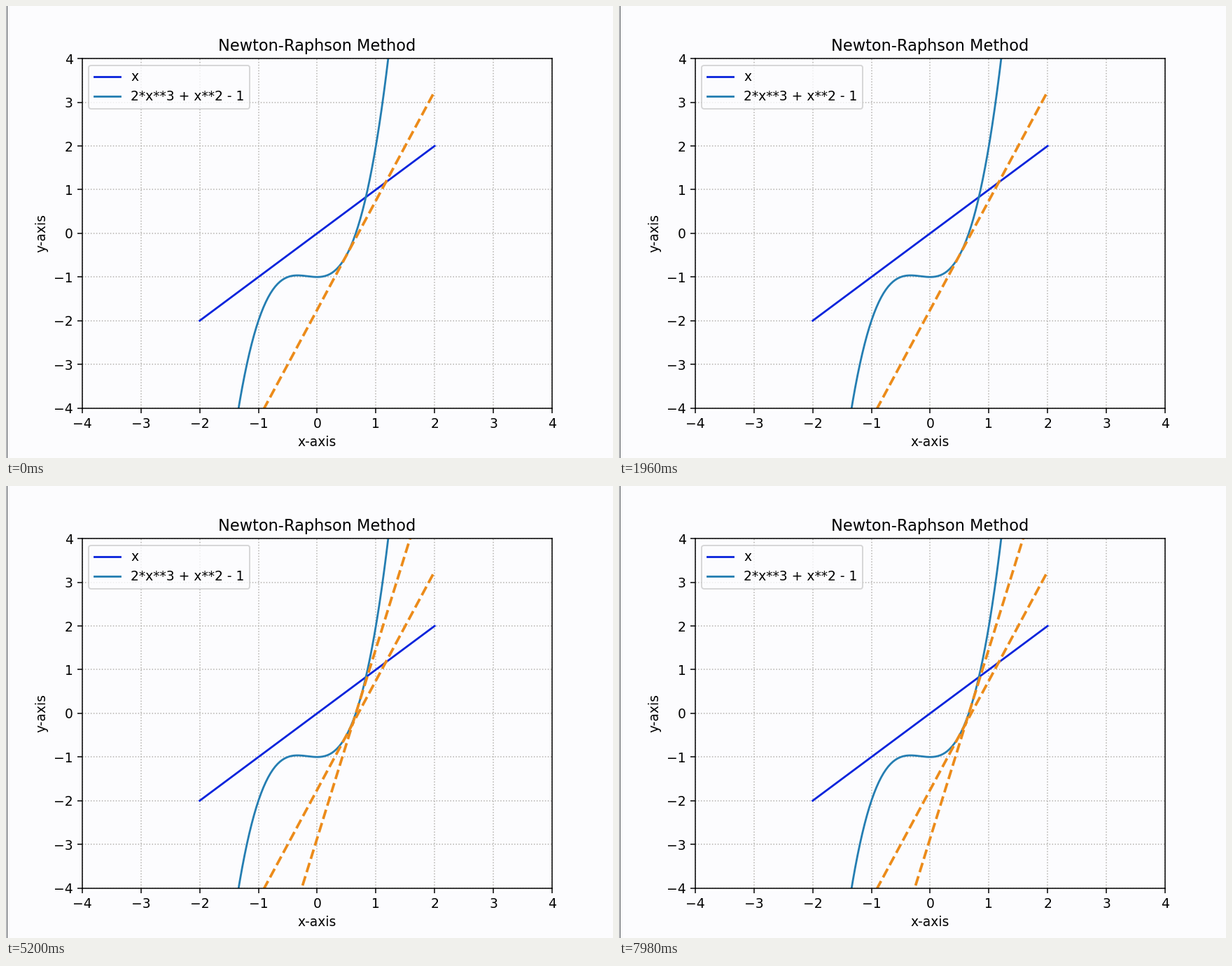
These frames come from a looping animation (867x646 px, 8000 ms). A matplotlib script:

```python
import matplotlib.pyplot as plt
import numpy as np
from matplotlib.animation import FuncAnimation
from matplotlib.lines import Line2D

W, H, DPI = 867, 646, 135.2
INTERVAL, FRAMES = 100, 80
STEP_AT = 4600  # ms at which the second tangent appears

PAPER = "#fcfcfe"
BLUE = "#0a24dc"
TEAL = "#257eb2"
ORANGE = "#ec8b1a"

plt.rcParams["font.family"] = "DejaVu Sans"


def f(x):
    return 2 * x**3 + x**2 - 1


def slope(x):
    return 6 * x**2 + 2 * x


def tangent(x0):
    x = np.array([-2.0, 2.0])
    return ax.plot(x, f(x0) + slope(x0) * (x - x0), "--", color=ORANGE, lw=2)[0]


# the tiny surplus keeps the pixel size from being truncated
fig = plt.figure(figsize=((W + 0.001) / DPI, (H + 0.001) / DPI), dpi=DPI, facecolor=PAPER)
left, right, top, bottom = 108.9, 780.0, 75.2, 574.6
ax = fig.add_axes([left / W, 1 - bottom / H, (right - left) / W, (bottom - top) / H],
                  facecolor=PAPER)

xs = np.linspace(-2, 2, 200)
ax.plot(xs, xs, color=BLUE, label="x")
ax.plot(xs, f(xs), color=TEAL, label="2*x**3 + x**2 - 1")

guess = 0.5
tangent(guess)
second = tangent(guess - f(guess) / slope(guess))

ax.set(xlim=(-4, 4), ylim=(-4, 4), xlabel="x-axis", ylabel="y-axis",
       title="Newton-Raphson Method")
ax.set_xticks(range(-4, 5))
ax.set_yticks(range(-4, 5))
ax.grid(linestyle=":", color="#b2b0ac")
ax.legend(loc="upper left", facecolor=PAPER)

# thin dark rule along the left border of the stage
fig.add_artist(Line2D([0.5 / W] * 2, [0, 1], color="#3c4044", lw=72 / DPI))


def update(i):
    second.set_visible(i * INTERVAL >= STEP_AT)
    return [second]


anim = FuncAnimation(fig, update, frames=FRAMES, interval=INTERVAL,
                     init_func=lambda: update(0), repeat=True, repeat_delay=0)
plt.show()
```
